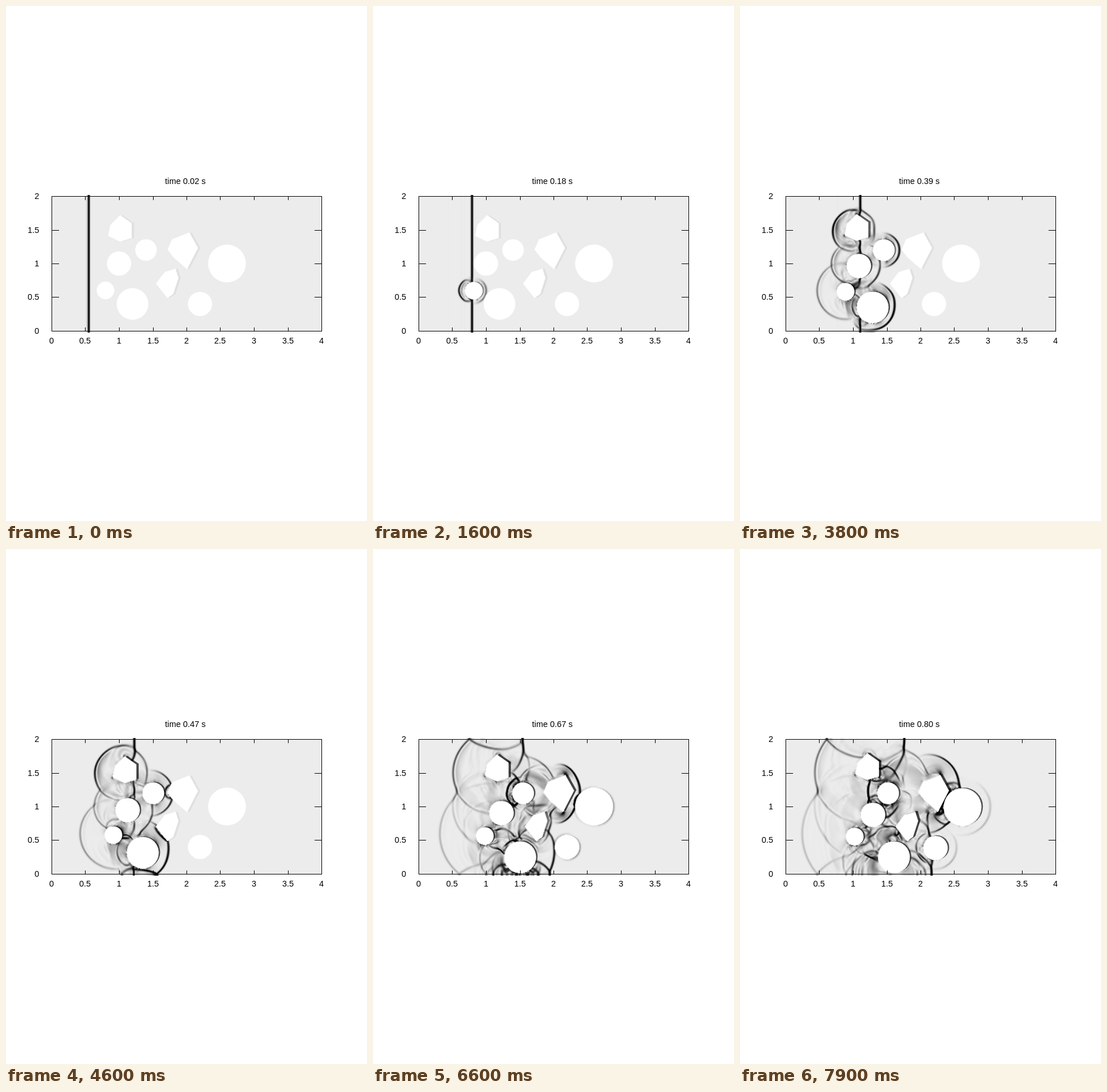
Write an HTML page with a canvas that moves like this. It is 626 px wide and 894 px high and loops after 8000 ms.

```html
<!DOCTYPE html>
<html lang="en">
<head>
<meta charset="utf-8">
<title>Shock wave over drifting bodies</title>
<style>
  html, body { margin: 0; width: 100%; height: 100%; overflow: hidden; background: #fff; }
  canvas { display: block; }
</style>
</head>
<body>
<canvas id="stage" width="626" height="894"></canvas>
<script>
const ctx = document.getElementById('stage').getContext('2d');
const BOX = { x: 79, y: 330, w: 468, h: 234 }, UNIT = 117;
const FLOOR = BOX.y + BOX.h;

// Discs are placed in plot units, polygons in stage pixels.
// Each body rests until start, then drifts at (vx, vy) pixels per second.
function disc(px, py, pr, start, vx, vy, rebound = Infinity) {
  const x = BOX.x + px * UNIT, y = FLOOR - py * UNIT, r = pr * UNIT;
  return { x, y, r, box: [x - r, y - r, x + r, y + r], start, vx, vy, rebound };
}
function poly(start, vx, vy, ...pts) {
  const xs = pts.map(p => p[0]), ys = pts.map(p => p[1]);
  const box = [Math.min(...xs), Math.min(...ys), Math.max(...xs), Math.max(...ys)];
  return { pts, box, start, vx, vy, rebound: Infinity };
}
const bodies = [
  disc(.8, .6, .13, .1, 39, 8),
  disc(1, 1, .18, .2, 60, 25),
  disc(1.2, .4, .235, .25, 90, 50),
  disc(1.4, 1.2, .16, .28, 75, 2, .57),
  disc(2.6, 1, .28, .64, 20, 7),
  disc(2.2, .4, .18, .64, 20, 13),
  poly(.27, 45, -16, [198, 363], [218, 377], [218, 403], [198, 409], [177, 399], [181, 380]),
  poly(.5, 105, -3, [318, 393], [333, 420], [314, 457], [291, 437], [280, 423], [288, 405]),
  poly(.58, 50, 0, [294, 456], [299, 472], [290, 500], [280, 507], [260, 482], [275, 462])
];

// Time spent drifting, with a short soft onset.
function travel(t) {
  const onset = .04;
  return t <= 0 ? 0 : t < onset ? t * t / (2 * onset) : t - onset / 2;
}

function offset(b, s) {
  const t = travel(Math.min(s, b.rebound) - b.start) - .35 * Math.max(0, s - b.rebound);
  return [b.vx * t, Math.min(b.vy * t, FLOOR - 1.5 - b.box[3])];
}

function inside(b, x, y) {
  if (b.r) return (x - b.x) ** 2 + (y - b.y) ** 2 < b.r ** 2;
  return b.pts.every(([x0, y0], i) => {
    const [x1, y1] = b.pts[(i + 1) % b.pts.length];
    return (x1 - x0) * (y - y0) - (y1 - y0) * (x - x0) >= 0;
  });
}

// Gas flow: MUSCL-Hancock with HLLC fluxes, split by direction.
const NX = 330, NY = 200, N = NX * NY, CELL = 1.17, GAMMA = 1.4, DT = .0025, K = DT / .01;
const MACH = 1.5, FRONT = .517, squared = MACH * MACH;
const ahead = { r: GAMMA, u: 0, p: 1 };
const behind = {
  r: GAMMA * (GAMMA + 1) * squared / ((GAMMA - 1) * squared + 2),
  u: 2 / (GAMMA + 1) * (MACH - 1 / MACH),
  p: 1 + 2 * GAMMA / (GAMMA + 1) * (squared - 1)
};
const array = n => new Float64Array(n);
const rho = array(N), momX = array(N), momY = array(N), energy = array(N);
const fields = [rho, momX, momY, energy];
let solid = new Uint8Array(N), oldSolid = new Uint8Array(N), steps = 0;

for (let i = 0; i < N; i++) {
  const { r, u, p } = (i % NX + .5) / 100 < FRONT ? behind : ahead;
  rho[i] = r; momX[i] = r * u;
  energy[i] = p / (GAMMA - 1) + r * u * u / 2;
}

function placeBodies(s) {
  [solid, oldSolid] = [oldSolid, solid];
  solid.fill(0);
  bodies.forEach((b, id) => {
    const [dx, dy] = offset(b, s), [nx, ny] = offset(b, s + DT);
    b.vel = [(nx - dx) / DT / UNIT, (ny - dy) / DT / UNIT];
    const col = x => Math.floor((x + dx - BOX.x) / CELL);
    const row = y => Math.floor((y + dy - BOX.y) / CELL);
    const [x0, y0, x1, y1] = b.box;
    for (let j = Math.max(0, row(y0)); j <= Math.min(NY - 1, row(y1)); j++)
      for (let i = Math.max(0, col(x0)); i <= Math.min(NX - 1, col(x1)); i++)
        if (inside(b, BOX.x + (i + .5) * CELL - dx, BOX.y + (j + .5) * CELL - dy)) solid[j * NX + i] = id + 1;
  });
  // Uncovered cells take the mean of the gas around them.
  for (let i = NX + 1; i < N - NX - 1; i++) {
    if (solid[i] || !oldSolid[i]) continue;
    const near = [1, -1, NX, -NX, NX + 1, NX - 1, 1 - NX, -1 - NX]
      .map(d => i + d).filter(c => !solid[c] && !oldSolid[c]);
    if (near.length) for (const f of fields) f[i] = near.reduce((sum, c) => sum + f[c], 0) / near.length;
    else { rho[i] = GAMMA; momX[i] = momY[i] = 0; energy[i] = 1 / (GAMMA - 1); }
  }
}

const LINE = NX + 4, four = () => [0, 1, 2, 3].map(() => array(LINE));
const prim = four(), low = four(), high = four(), flux = four();
const [R, U, W, P] = prim;

function limited(a, c) {
  const d = a[c] - a[c - 1], e = a[c + 1] - a[c];
  return d * e <= 0 ? 0 : Math.abs(d) < Math.abs(e) ? d : e;
}

function ghost(g, src, wall) {
  R[g] = R[src]; W[g] = W[src]; P[g] = P[src];
  U[g] = wall === null ? U[src] : 2 * wall - U[src];
}

function predict(c) {
  const dr = limited(R, c), du = limited(U, c), dw = limited(W, c), dp = limited(P, c);
  const h = K / 2, u = U[c];
  const r = R[c] - h * (u * dr + R[c] * du), v = u - h * (u * du + dp / R[c]);
  const w = W[c] - h * u * dw, p = P[c] - h * (u * dp + GAMMA * P[c] * du);
  low[0][c] = Math.max(.1, r - dr / 2); high[0][c] = Math.max(.1, r + dr / 2);
  low[1][c] = v - du / 2; high[1][c] = v + du / 2;
  low[2][c] = w - dw / 2; high[2][c] = w + dw / 2;
  low[3][c] = Math.max(.05, p - dp / 2); high[3][c] = Math.max(.05, p + dp / 2);
}

function hllc(c) {
  const rL = high[0][c], uL = high[1][c], pL = high[3][c];
  const rR = low[0][c + 1], uR = low[1][c + 1], pR = low[3][c + 1];
  const cL = Math.sqrt(GAMMA * pL / rL), cR = Math.sqrt(GAMMA * pR / rR);
  const sL = Math.min(uL - cL, uR - cR), sR = Math.max(uL + cL, uR + cR);
  const mL = rL * (sL - uL), mR = rR * (sR - uR);
  const mid = (pR - pL + uL * mL - uR * mR) / (mL - mR), left = mid >= 0;
  const r = left ? rL : rR, u = left ? uL : uR, p = left ? pL : pR, s = left ? sL : sR;
  const w = left ? high[2][c] : low[2][c + 1];
  const e = p / (GAMMA - 1) + r * (u * u + w * w) / 2;
  let f0 = r * u, f1 = r * u * u + p, f2 = r * u * w, f3 = u * (e + p);
  if (left ? s < 0 : s > 0) {
    const star = r * (s - u) / (s - mid);
    f0 += s * (star - r);
    f1 += s * (star * mid - r * u);
    f2 += s * (star - r) * w;
    f3 += s * (star * (e / r + (mid - u) * (mid + p / (r * (s - u)))) - e);
  }
  flux[0][c] = f0; flux[1][c] = f1; flux[2][c] = f2; flux[3][c] = f3;
}

function sweep(base, stride, len, axis) {
  const mn = axis ? momY : momX, mt = axis ? momX : momY;
  const wallSpeed = j => j < 0 || j >= len ? (axis ? 0 : null) : bodies[solid[base + j * stride] - 1].vel[axis];
  for (let a = 0; a < len; a++) {
    if (solid[base + a * stride]) continue;
    let b = a;
    for (; b < len && !solid[base + b * stride]; b++) {
      const q = base + b * stride, c = b - a + 2, r = Math.max(.1, rho[q]);
      R[c] = r; U[c] = mn[q] / r; W[c] = mt[q] / r;
      P[c] = Math.max(.05, (GAMMA - 1) * (energy[q] - r * (U[c] * U[c] + W[c] * W[c]) / 2));
    }
    const end = b - a + 1, before = wallSpeed(a - 1), after = wallSpeed(b);
    ghost(1, 2, before); ghost(0, Math.min(3, end), before);
    ghost(end + 1, end, after); ghost(end + 2, Math.max(2, end - 1), after);
    for (let c = 1; c <= end + 1; c++) predict(c);
    for (let c = 1; c <= end; c++) hllc(c);
    for (let c = 2; c <= end; c++) {
      const q = base + (a + c - 2) * stride;
      rho[q] -= K * (flux[0][c] - flux[0][c - 1]);
      mn[q] -= K * (flux[1][c] - flux[1][c - 1]);
      mt[q] -= K * (flux[2][c] - flux[2][c - 1]);
      energy[q] -= K * (flux[3][c] - flux[3][c - 1]);
    }
    a = b;
  }
}

function step() {
  placeBodies(steps * DT);
  const rows = () => { for (let j = 0; j < NY; j++) sweep(j * NX, 1, NX, 0); };
  const cols = () => { for (let i = 0; i < NX; i++) sweep(i, NX, NY, 1); };
  if (steps++ % 2) { cols(); rows(); } else { rows(); cols(); }
}

// Density gradient as black with varying alpha.
function schlieren() {
  const shot = document.createElement('canvas');
  shot.width = NX; shot.height = NY;
  const g = shot.getContext('2d'), img = g.createImageData(NX, NY);
  for (let j = 0; j < NY; j++) for (let i = 0; i < NX; i++) {
    const q = j * NX + i;
    if (solid[q]) continue;
    const at = (ok, n) => ok && !solid[n] ? rho[n] : rho[q];
    const gx = at(i < NX - 1, q + 1) - at(i > 0, q - 1);
    const gy = at(j < NY - 1, q + NX) - at(j > 0, q - NX);
    img.data[q * 4 + 3] = 255 * (1 - Math.exp(-Math.pow(2.9 * Math.hypot(gx, gy), 1.4)));
  }
  g.putImageData(img, 0, 0);
  return shot;
}

const shots = [];
function shotAt(k) {
  while (shots.length <= k) {
    const goal = 8 + 4 * shots.length;
    while (steps < goal) step();
    shots.push(schlieren());
  }
  return shots[k];
}

function fillBody(b, dx, dy, style) {
  ctx.fillStyle = style;
  ctx.beginPath();
  if (b.r) ctx.arc(b.x + dx, b.y + dy, b.r, 0, 7);
  else b.pts.forEach(([x, y]) => ctx.lineTo(x + dx, y + dy));
  ctx.fill();
}

// White bodies with a dark lee edge that grows once they move.
function drawBodies(s) {
  for (const b of bodies) {
    const [dx, dy] = offset(b, s), lee = b.r ? 2.5 : 4;
    const ramp = Math.min(1, Math.max(0, (s - b.start) / .14));
    fillBody(b, dx + lee, dy - lee * .35 * ramp, `rgba(0,0,0,${(b.r ? 0 : .05) + .65 * ramp})`);
  }
  for (const b of bodies) fillBody(b, ...offset(b, s), '#fff');
}

// Half pixels go to the odd neighbour.
const snap = v => Math.floor(v) | (v % 1 ? 1 : 0);

function drawAxes(s) {
  const { x, y, w, h } = BOX;
  ctx.fillStyle = ctx.strokeStyle = '#000';
  ctx.lineWidth = 1;
  ctx.font = '14.4px "Liberation Sans", Arial, sans-serif';
  ctx.strokeRect(x + .5, y + .5, w, h);
  ctx.beginPath();
  const line = (x0, y0, dx, dy) => { ctx.moveTo(x0, y0); ctx.lineTo(x0 + dx, y0 + dy); };
  ctx.textAlign = 'center';
  for (let v = 0; v <= 4; v += .5) {
    const px = snap(x + v * UNIT);
    line(px + .5, y, 0, 7);
    line(px + .5, y + h, 0, -6);
    ctx.fillText(v, px, 586);
  }
  ctx.textAlign = 'right';
  for (let v = 0; v <= 2; v += .5) {
    const py = snap(FLOOR - v * UNIT);
    line(x, py + .5, 13, 0);
    line(x + w, py + .5, -12, 0);
    ctx.fillText(v, 57.5, py + 5);
  }
  ctx.stroke();
  ctx.textAlign = 'center';
  ctx.fillText(`time ${s.toFixed(2)} s`, 311, 309);
}

function draw(ms) {
  const tick = Math.floor(ms % 8000 / 100);
  const k = tick > 20 ? tick - 1 : tick;   // one tick is held
  const s = .02 + .01 * k, shot = shotAt(k), w = NX * CELL;
  ctx.fillStyle = '#fff';
  ctx.fillRect(0, 0, 626, 894);
  ctx.fillStyle = '#ececec';
  ctx.fillRect(BOX.x, BOX.y, BOX.w, BOX.h);
  ctx.drawImage(shot, BOX.x, BOX.y, w, BOX.h);
  ctx.drawImage(shot, 0, 0, NX, 1, BOX.x, BOX.y - 2, w, 2);
  ctx.drawImage(shot, 0, NY - 1, NX, 1, BOX.x, FLOOR, w, 3);
  drawBodies(s);
  drawAxes(s);
}

const epoch = performance.now();
function loop() {
  draw(Math.max(0, performance.now() - epoch));
  requestAnimationFrame(loop);
}
loop();
</script>
</body>
</html>
```
